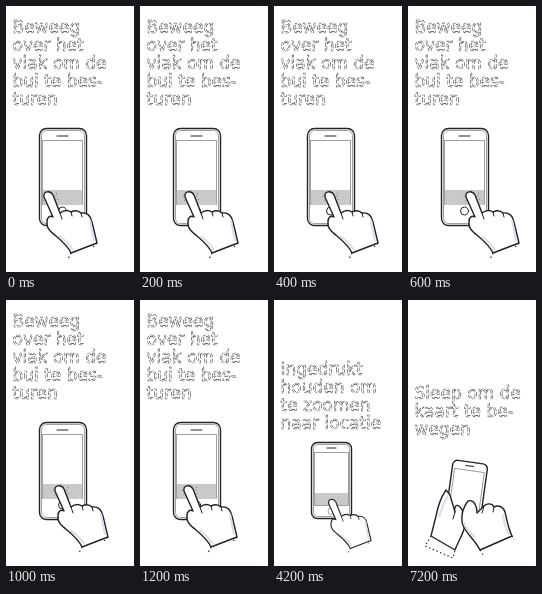
These frames come from a looping animation (128 by 266 pixels, 8000 ms). An HTML page:

```html
<!DOCTYPE html>
<html lang="nl">
<head>
<meta charset="utf-8">
<style>
html, body { margin: 0; width: 100%; height: 100%; overflow: hidden; background: #fff; }
svg { display: block; width: 100vw; height: 100vh; }
text { font: 17px "DejaVu Sans", sans-serif; fill: #fff; stroke: #444; stroke-width: .6; stroke-dasharray: 4 1.5; }
.ink { fill: #fff; stroke: #20222c; stroke-width: 1.4; stroke-linejoin: round; stroke-linecap: round; }
.line { fill: none; stroke: #20222c; stroke-width: 1; stroke-linecap: round; }
.thin { fill: none; stroke: #888; stroke-width: .8; }
.rough { fill: none; stroke: #20222c; stroke-width: 1.1; stroke-dasharray: 1.5 2.5; }
.shade { fill: none; stroke: #dcdcf0; stroke-width: 2; }
.pad { fill: #c9c9c9; }
.dots { fill: #777; }
</style>
</head>
<body>
<svg viewBox="0 0 128 266">
  <defs>
    <g id="hand">
      <path class="ink" stroke="none" d="M2 7C1 1 8 0 11 5L18 23C22 20 26 20 29 22C33 20 37 21 39 23C45 22 49 26 50 32L55 53L29 63C26 56 20 51 14 46C9 42 4 38 5 32C5 27 8 25 11 27Z"/>
      <path class="shade" d="M48 30L52 51M17 46Q26 52 31 60"/>
      <path class="line" d="M18 23L20 29M29 22L30 26M39 23L40 27"/>
      <path class="rough" d="M29 63L26 69M55 53L51 57"/>
    </g>
  </defs>

  <g class="scene">
    <g class="copy" data-y="26.5" data-lines="Beweeg|over het|vlak om de|bui te bes-|turen"></g>
    <rect class="ink" x="33.5" y="122.500" width="47" height="97" rx="7"/>
    <rect class="thin" x="35.5" y="124.500" width="43" height="93" rx="5"/>
    <rect class="thin" x="36.5" y="134.500" width="40" height="64"/>
    <rect class="pad" x="37" y="184" width="39" height="15"/>
    <path class="line" d="M51 130H62"/>
    <circle class="line" cx="56.500" cy="205" r="4"/>
    <g id="slider">
      <g id="ripple" class="dots"></g>
      <use href="#hand" y="184"/>
    </g>
  </g>

  <g class="scene">
    <g class="copy" data-y="74.5" data-lines="Ingedrukt|houden om|te zoomen|naar locatie"></g>
    <rect class="ink" x="37.500" y="142.500" width="40" height="76" rx="6"/>
    <rect class="thin" x="39.500" y="144.500" width="36" height="72" rx="4"/>
    <rect class="thin" x="40.500" y="152.500" width="34" height="53"/>
    <rect class="pad" x="41" y="193" width="33" height="12"/>
    <path class="line" d="M53 148H62"/>
    <circle class="thin" cx="57.500" cy="211" r="3.5"/>
    <use href="#hand" transform="translate(53 198) scale(.8)"/>
  </g>

  <g class="scene">
    <g class="copy" data-y="98.5" data-lines="Sleep om de|kaart te be-|wegen"></g>
    <g transform="rotate(8 60 192)">
      <rect class="ink" x="41" y="162" width="35" height="60" rx="5"/>
      <rect class="thin" x="43.500" y="170.500" width="30" height="42"/>
      <path class="line" d="M54 166H62"/>
    </g>
    <path class="ink" d="M38 190C33 197 30 206 28 216L23 236L47 250C50 242 54 236 56 229C58 222 56 211 52 207C48 203 46 207 47 212L42 195Z"/>
    <path class="ink" d="M60 201C56 206 53 213 54 222C55 231 66 238 72 250L104 236C100 228 99 220 97 212C95 206 90 205 86 207C84 203 79 203 76 206L69 213C69 206 66 199 60 201Z"/>
    <path class="shade" d="M95 214Q96 225 101 235M40 195Q34 206 31 217M56 222Q59 231 67 237"/>
    <path class="line" d="M47 212L45 219M76 206L74 213M86 207L85 212"/>
    <path class="rough" d="M23 236L17 246L45 258L47 250M72 250L75 255M104 236L106 240"/>
  </g>
</svg>
<script>
const SVG = "http://www.w3.org/2000/svg";
const add = (parent, tag, attrs) => {
  const node = document.createElementNS(SVG, tag);
  for (const key in attrs) node.setAttribute(key, attrs[key]);
  return parent.appendChild(node);
};

for (const copy of document.querySelectorAll(".copy"))
  copy.dataset.lines.split("|").forEach((line, i) => {
    add(copy, "text", { x: 6.5, y: +copy.dataset.y + i * 18 }).textContent = line;
  });

const ripple = document.getElementById("ripple");
for (let i = 0; i < 14; i++) {
  const angle = i * 2.4, reach = 5 + i % 3 * 2;
  add(ripple, "circle", {
    cx: 7 + Math.cos(angle) * reach, cy: 191 + Math.sin(angle) * reach * .75, r: .55
  });
}

const scenes = document.querySelectorAll(".scene");
const slider = document.getElementById("slider");
const handX = [36, 43, 49, 56, 52, 47, 42];

function draw(now) {
  const t = now % 8000;
  const current = t < 4200 ? 0 : t < 7200 ? 1 : 2;
  scenes.forEach((scene, i) => scene.style.display = i === current ? "" : "none");
  const step = Math.min(6, Math.floor(t / 200));
  slider.setAttribute("transform", `translate(${handX[step]} 0)`);
  requestAnimationFrame(draw);
}
draw(performance.now());
</script>
</body>
</html>
```
